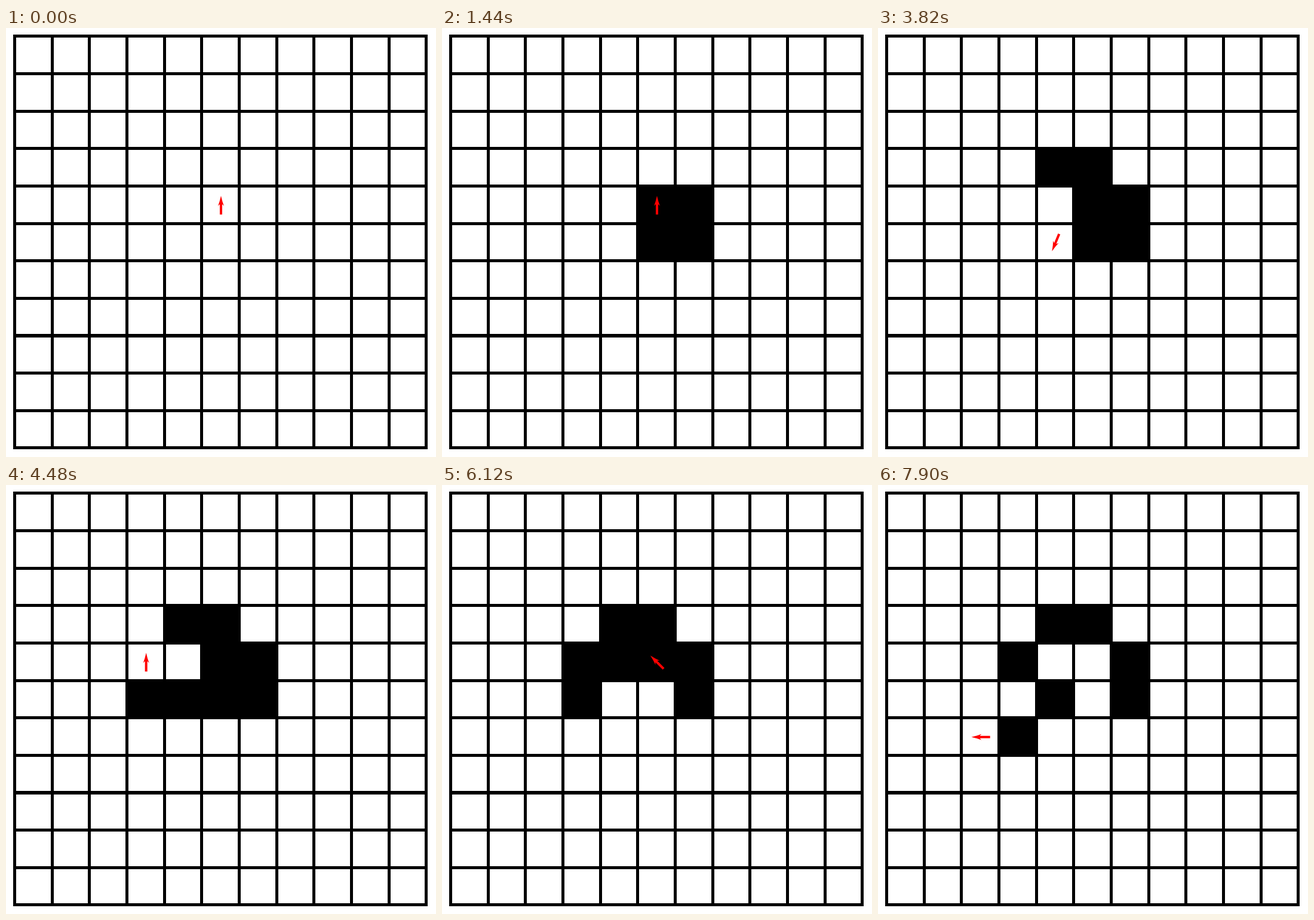
A matplotlib script for the animation above (8000 ms loop, 720 px wide and 718 px high).

```python
import math

import matplotlib.pyplot as plt
import numpy as np
from matplotlib.animation import FuncAnimation
from matplotlib.collections import PolyCollection
from matplotlib.patches import Polygon, Rectangle

W, H = 720, 718
N = 11                      # cells per side
CELL = 62.65
X0, Y0 = 14.6, 13.8         # centre of the first grid lines
LINE = 5
TICK, STEP, LOOP = 20, 380, 8000
HALF = CELL / 4             # half the arrow's length


def walk(steps):
    """Ant states: column, row, heading, turn, cells before, cells after."""
    cells = np.zeros((N, N), bool)
    col, row, heading = 5, 4, -90
    states = []
    for _ in range(steps):
        turn = -90 if cells[row, col] else 90
        before = cells.copy()
        cells[row, col] ^= True
        states.append((col, row, heading, turn, before, cells.copy()))
        heading += turn
        col += round(math.cos(math.radians(heading)))
        row += round(math.sin(math.radians(heading)))
    return states


STATES = walk(LOOP // STEP + 1)


def edges(start, first, last, inset):
    """Pixel edges of a run of cells, moved inwards by inset."""
    return (round(start + first * CELL + inset),
            round(start + last * CELL - inset))


def square(col, row):
    left, right = edges(X0, col, col + 1, LINE / 2)
    top, bottom = edges(Y0, row, row + 1, LINE / 2)
    return [(left, top), (right, top), (right, bottom), (left, bottom)]


# Upper half of an arrow pointing right, mirrored for the lower half
UPPER = [(HALF, 0), (HALF - 9.5, 2.4), (HALF - 17, 5),
         (HALF - 14, 2), (-HALF, 2)]
ARROW = np.array(UPPER + [(x, -y) for x, y in UPPER[:0:-1]])


def arrow_at(x, y, angle):
    a = math.radians(angle)
    c, s = math.cos(a), math.sin(a)
    return ARROW @ np.array([(c, s), (-s, c)]) + (x, y)


fig = plt.figure(figsize=(W / 100, H / 100), dpi=100, facecolor="white")
ax = fig.add_axes([0, 0, 1, 1])
ax.set_xlim(0, W)
ax.set_ylim(H, 0)
ax.axis("off")

left, right = edges(X0, 0, N, -LINE / 2)
top, bottom = edges(Y0, 0, N, -LINE / 2)
ax.add_patch(Rectangle((left, top), right - left, bottom - top,
                       fc="black", lw=0, snap=False))
board = PolyCollection([square(c, r) for r in range(N) for c in range(N)],
                       linewidths=0, zorder=2)
board.set_snap(False)
ax.add_collection(board, autolim=False)
ant = Polygon(ARROW, closed=True, fc="red", lw=0, zorder=3, snap=False)
ax.add_patch(ant)


def draw(frame):
    k, phase = divmod(frame * TICK, STEP)
    col, row, heading, turn, before, after = STATES[k]
    angle = heading + turn * min(phase / 80, 1)
    moved = min(max((phase - 140) / 160, 0), 1)
    a = math.radians(angle)
    x = X0 + 0.8 + (col + 0.5 + moved * math.cos(a)) * CELL
    y = Y0 + 0.8 + (row + 0.5 + moved * math.sin(a)) * CELL
    ant.set_xy(arrow_at(x, y, angle))
    cells = after if phase >= 100 else before
    board.set_facecolor(["black" if c else "white" for c in cells.flat])
    return board, ant


anim = FuncAnimation(fig, draw, frames=LOOP // TICK, interval=TICK,
                     init_func=lambda: draw(0), repeat=True, repeat_delay=0)
plt.show()
```
